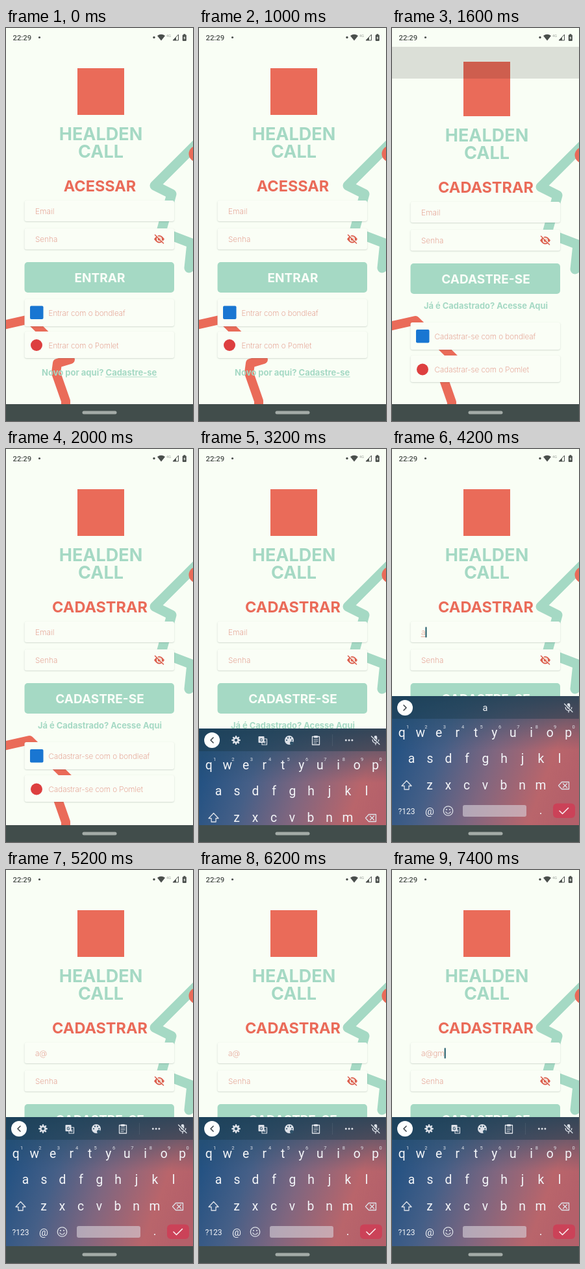
Animation, 288 px wide and 606 px high, one loop 8 s. Source, as an HTML page with a canvas:

```html
<!DOCTYPE html>
<html lang="pt">
<head>
<meta charset="utf-8">
<title>Cadastro</title>
<style>
html, body { margin: 0; width: 100%; height: 100%; overflow: hidden; background: #f9fef5; }
canvas { display: block; width: 288px; height: 606px; }
</style>
</head>
<body>
<canvas id="stage"></canvas>
<script>
const W = 288, H = 606, LOOP = 8000, STEP = 200;
const RED = '#ea6b59', GREEN = '#a5d9c4', PAPER = '#f9fef5', BAR = '#414d4b', FAINT = '#de8675';
const canvas = document.getElementById('stage');
const ctx = canvas.getContext('2d');
const dpr = window.devicePixelRatio || 1;
canvas.width = W * dpr;
canvas.height = H * dpr;

const INTER = 'Inter, "Open Sans", sans-serif';
const ROBOTO = 'Roboto, "Noto Sans", sans-serif';

function text(str, x, y, size, color, weight = 700, align = 'center', family = INTER) {
  ctx.font = `${weight} ${size}px ${family}`;
  ctx.textAlign = align;
  ctx.fillStyle = color;
  ctx.fillText(str, x, y);
  return ctx.measureText(str).width;
}

function line(points, color, width, close) {
  ctx.beginPath();
  points.forEach(([x, y], i) => i ? ctx.lineTo(x, y) : ctx.moveTo(x, y));
  if (close) ctx.closePath();
  ctx.strokeStyle = color;
  ctx.lineWidth = width;
  ctx.lineJoin = ctx.lineCap = 'round';
  ctx.stroke();
}

function shape(points, color) {
  ctx.beginPath();
  points.forEach(([x, y]) => ctx.lineTo(x, y));
  ctx.fillStyle = color;
  ctx.fill();
}

function disc(x, y, r, color) {
  ctx.beginPath();
  ctx.arc(x, y, r, 0, 7);
  ctx.fillStyle = color;
  ctx.fill();
}

function arc(x, y, r, color, width, from = 0, to = Math.PI * 2) {
  ctx.beginPath();
  ctx.arc(x, y, r, from, to);
  ctx.strokeStyle = color;
  ctx.lineWidth = width;
  ctx.stroke();
}

function box(x, y, w, h, r, color) {
  ctx.beginPath();
  ctx.roundRect(x, y, w, h, r);
  ctx.fillStyle = color;
  ctx.fill();
}

function card(y, h) {
  ctx.save();
  ctx.shadowColor = 'rgba(60,80,70,.24)';
  ctx.shadowBlur = 2 * dpr;
  ctx.shadowOffsetY = 0.7 * dpr;
  box(28.5, y, 230.5, h, 3, '#fafef6');
  ctx.restore();
}

// ---- pages ----

function backdrop() {
  ctx.fillStyle = PAPER;
  ctx.fillRect(0, -20, W, H + 40);
  line([[300, 172], [229, 243], [255, 256], [239, 314], [286, 332], [282, 370]], GREEN, 15);
  disc(294, 194, 12.5, RED);
  line([[-8, 459], [36, 449], [99, 511], [79, 517], [77, 532], [92, 575], [92, 595]], RED, 14);
}

function eyeOff(x, y) {
  const c = '#dc604f';
  ctx.beginPath();
  ctx.moveTo(x - 8, y);
  ctx.quadraticCurveTo(x, y - 12, x + 8, y);
  ctx.quadraticCurveTo(x, y + 12, x - 8, y);
  ctx.fillStyle = c;
  ctx.fill();
  arc(x, y, 3.2, PAPER, 1.5);
  line([[x - 5.5, y - 7], [x + 8, y + 6.5]], PAPER, 1.6);
  line([[x - 6.5, y - 6.5], [x + 6.5, y + 6.5]], c, 1.6);
}

function header(title) {
  backdrop();
  box(110, 62, 72, 72, 0, RED);
  text('HEALDEN', 146, 172.5, 27, GREEN);
  text('CALL', 146, 200, 27, GREEN);
  text(title, 144.5, 252, 23.5, RED);
}

function fields(email, caret) {
  card(266, 32);
  card(309, 32.5);
  let w = 0;
  if (email) {
    w = text(email, 45, 286.5, 12, FAINT, 200, 'left');
    if (email === 'a') line([[45, 289.5], [45 + w, 289.5]], FAINT, 0.7);
  } else {
    text('Email', 45, 286.5, 12, FAINT, 200, 'left');
  }
  if (caret) {
    ctx.fillStyle = '#1f5a68';
    ctx.fillRect(45 + w, 274.5, 2, 16);
  }
  text('Senha', 45, 329.7, 11.8, FAINT, 200, 'left');
  eyeOff(236, 325.5);
}

function button(label) {
  box(28.5, 361, 230.5, 47, 5, GREEN);
  text(label, 144.5, 392.3, 19, '#fbfff9');
}

function socials(y1, y2, h, dy, verb) {
  card(y1, h);
  card(y2, h - 1);
  box(37, y1 + dy - 10.5, 20.5, 20.5, 2, '#1976d2');
  disc(47, y2 + dy, 9, '#dd3f3f');
  text(verb + ' com o bondleaf', 65.5, y1 + dy + 4.5, 11.7, FAINT, 200, 'left');
  text(verb + ' com o Pomlet', 65.5, y2 + dy + 4.5, 11.7, FAINT, 200, 'left');
}

function loginPage() {
  header('ACESSAR');
  fields('', false);
  button('ENTRAR');
  socials(418, 468, 42, 21, 'Entrar');
  const w = text('Novo por aqui? ', 55, 535.5, 13, GREEN, 700, 'left');
  const lw = text('Cadastre-se', 55 + w, 535.5, 13, GREEN, 700, 'left');
  line([[55 + w, 538], [55 + w + lw, 538]], GREEN, 0.9);
}

function signupPage(email, caret) {
  header('CADASTRAR');
  fields(email, caret);
  button('CADASTRE-SE');
  text('Já é Cadastrado? Acesse Aqui', 144.5, 431, 12.9, GREEN);
  socials(452, 503, 42, 21.5, 'Cadastrar-se');
}

// The new page is uncovered from below while the old one drifts up under a scrim.
function transition(edge, rise, drift) {
  ctx.save();
  ctx.beginPath();
  ctx.rect(0, 29, W, H);
  ctx.clip();
  ctx.save();
  ctx.translate(0, -rise);
  loginPage();
  ctx.restore();
  ctx.fillStyle = 'rgba(0,0,0,.12)';
  ctx.fillRect(0, 29, W, H);
  ctx.beginPath();
  ctx.rect(0, edge, W, H);
  ctx.clip();
  ctx.translate(0, drift);
  signupPage('', false);
  ctx.restore();
}

// ---- system bars ----

function statusBar() {
  const c = '#4a4f4c';
  text('22:29', 10.5, 18.6, 11.3, c, 500, 'left', ROBOTO);
  disc(51.5, 14.5, 1.6, c);
  disc(228, 14.5, 1.7, c);
  ctx.beginPath();
  ctx.moveTo(239, 19.5);
  ctx.lineTo(233, 12);
  ctx.quadraticCurveTo(239, 7.5, 245, 12);
  ctx.fillStyle = c;
  ctx.fill();
  text('4G', 250.5, 13.5, 5.5, '#999e99', 400, 'center', ROBOTO);
  line([[257.5, 19], [265.5, 19], [265.5, 10.5]], c, 1, true);
  shape([[257.5, 19], [262, 19], [262, 14.3]], c);
  box(271.8, 10.5, 6, 9.5, 1, c);
  box(273.4, 9.3, 2.8, 2, 0, c);
  shape([[275.5, 12], [273.3, 15.8], [274.7, 15.8], [274.3, 18.5], [276.5, 14.7], [275, 14.7]], PAPER);
}

function navBar() {
  ctx.fillStyle = BAR;
  ctx.fillRect(0, 580, W, 26);
  box(117.5, 590.5, 53, 5, 2.5, '#a3aba7');
}

// ---- keyboard ----

function wash(x0, y0, x1, y1, stops) {
  const g = ctx.createLinearGradient(x0, y0, x1, y1);
  stops.forEach(([at, color]) => g.addColorStop(at, color));
  ctx.fillStyle = g;
  ctx.fillRect(0, 381, W, 225);
}

function micOff(x, y, c) {
  box(x - 2.3, y - 7, 4.6, 8.5, 2.3, c);
  arc(x, y - 0.5, 4.8, c, 1.3, 0, Math.PI);
  line([[x, y + 4.5], [x, y + 7]], c, 1.3);
  line([[x - 5.5, y - 6.5], [x + 7, y + 6]], '#3f4c5c', 1.2);
  line([[x - 6.5, y - 6], [x + 6, y + 6.5]], c, 1.2);
}

function toolbar(c) {
  const y = 399, hole = '#30526a';
  for (let i = 0; i < 8; i++) {
    const a = i * Math.PI / 4;
    line([[57, y], [57 + 5.7 * Math.cos(a), y + 5.7 * Math.sin(a)]], c, 2.4);
  }
  disc(57, y, 4.8, c);
  disc(57, y, 2.3, hole);
  box(91.5, 393, 9, 10, 1, c);
  line([[97, 397], [104.5, 397], [104.5, 406], [97, 406]], c, 1.1, true);
  text('G', 95.8, 401, 7, hole, 700, 'center', ROBOTO);
  text('x', 101.3, 404, 6.5, c, 500, 'center', ROBOTO);
  disc(139, y, 7, c);
  disc(142.8, 403.5, 2.7, hole);
  for (const [x, dy] of [[135, 0], [137, -3.6], [141, -3.6], [143.3, 0]]) disc(x, y + dy, 1.1, hole);
  line([[174.5, 393.5], [185.5, 393.5], [185.5, 406], [174.5, 406]], c, 1.3, true);
  box(177, 392, 6, 3.5, 1, c);
  for (let i = 0; i < 3; i++) {
    line([[177, 398 + i * 2.6], [i < 2 ? 183 : 181, 398 + i * 2.6]], c, 0.9);
    disc(226.3 + i * 4.8, y, 1.5, c);
  }
  ctx.fillStyle = 'rgba(255,255,255,.08)';
  ctx.fillRect(205, 390, 1, 18);
}

function keyRow(keys, x0, y) {
  [...keys].forEach((k, i) => text(k, x0 + i * 28.5, y, 19.3, '#f3f5f8', 400, 'center', ROBOTO));
}

function keyboard(suggest) {
  const c = '#dde1e8', white = '#f3f5f8';
  wash(0, 440, 270, 540, [[0, '#1f5082'], [0.28, '#455f87'], [0.55, '#80667f'], [0.85, '#b9656b'], [1, '#b4606a']]);
  wash(0, 381, 0, 465, [[0, 'rgba(34,72,98,.75)'], [0.45, 'rgba(42,78,104,.45)'], [1, 'rgba(50,80,110,0)']]);
  ctx.fillStyle = 'rgba(26,56,70,.42)';
  ctx.fillRect(0, 381, W, 35);

  disc(20, 399, 12, '#fdfefd');
  const d = suggest ? 2 : -2;
  line([[20 - d, 395], [20 + d, 399], [20 - d, 403]], '#3c4348', 1.6);
  if (suggest) text(suggest, 143.5, 404, 14.5, white, 400, 'center', ROBOTO);
  else toolbar(c);
  micOff(272, 399, c);

  keyRow('qwertyuiop', 15.2, 443.5);
  [...'1234567890'].forEach((n, i) => text(n, 24 + i * 28.4, 431, 7.5, c, 400, 'center', ROBOTO));
  keyRow('asdfghjkl', 30, 484);
  keyRow('zxcvbnm', 58, 524.5);
  line([[22.5, 511.5], [30, 519.5], [26, 519.5], [26, 525], [19, 525], [19, 519.5], [15, 519.5]], c, 1.3, true);
  line([[256.5, 519], [261.5, 513.5], [272.5, 513.5], [272.5, 524.5], [261.5, 524.5]], c, 1.3, true);
  line([[263.5, 516], [269.5, 522]], c, 1.3);
  line([[269.5, 516], [263.5, 522]], c, 1.3);

  text('?123', 22.5, 562.5, 12, white, 400, 'center', ROBOTO);
  text('@', 58, 563.5, 15.5, white, 400, 'center', ROBOTO);
  arc(86.5, 558, 7.2, c, 1.3);
  disc(84, 556, 1.1, c);
  disc(89, 556, 1.1, c);
  arc(86.5, 558, 4, c, 1.2, 0.4, Math.PI - 0.4);
  box(109, 549, 98, 18, 3, 'rgba(215,208,216,.62)');
  text('.', 229, 563, 18, white, 400, 'center', ROBOTO);
  box(248, 546.5, 34, 22.5, 6, '#cb4258');
  line([[258, 558], [262.5, 562.5], [271.5, 553.5]], '#fbeef0', 1.6);
}

// ---- timeline ----

function emailAt(t) {
  if (t < 4200) return '';
  if (t < 4800) return 'a';
  if (t < 7000) return 'a@';
  return t < 7400 ? 'a@g' : 'a@gm';
}

const caretSpans = [[3400, 3800], [4200, 4600], [4800, 5200], [5600, 6200], [6600, 8000]];

function draw(now) {
  const t = Math.floor((now % LOOP) / STEP) * STEP;
  ctx.setTransform(dpr, 0, 0, dpr, 0, 0);
  ctx.fillStyle = PAPER;
  ctx.fillRect(0, 0, W, H);

  if (t < 1600) loginPage();
  else if (t < 2000) {
    const k = t < 1800 ? 1 : 0.12;
    transition(29 + 49 * k, 10, 2 * k);
  } else {
    signupPage(emailAt(t), caretSpans.some(([a, b]) => t >= a && t < b));
  }

  if (t >= 3200) {
    ctx.save();
    ctx.translate(0, t < 3400 ? 50 : 0);
    keyboard(t >= 4200 && t < 4800 ? 'a' : '');
    ctx.restore();
  }
  statusBar();
  navBar();
}

const start = performance.now();
function tick() {
  draw(performance.now() - start);
  requestAnimationFrame(tick);
}
tick();
</script>
</body>
</html>
```
